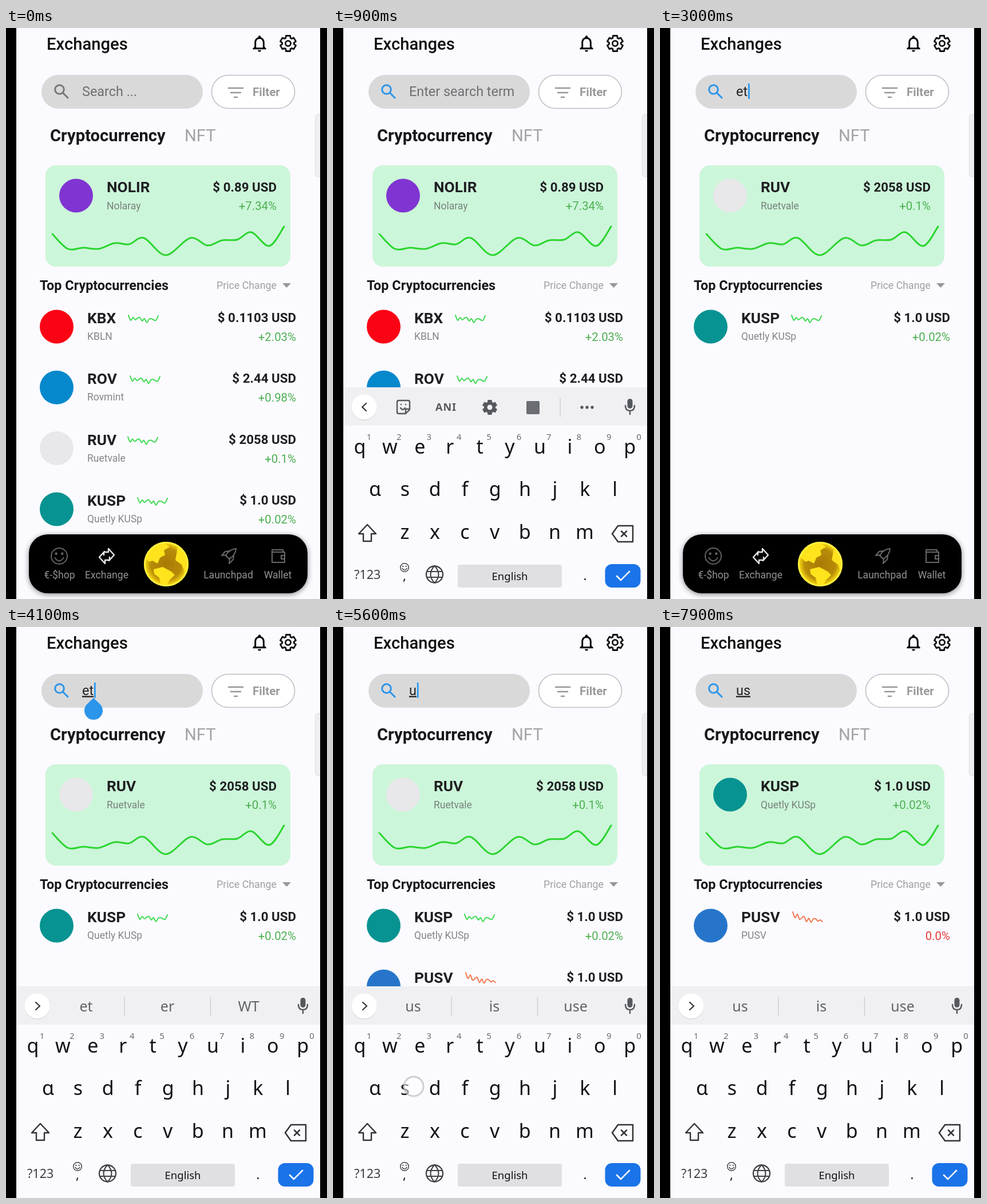
Recreate the animation shown at these times as an HTML page. Size 561 by 998 pixels, loop 8 s.

```html
<!DOCTYPE html>
<html lang="en">
<head>
<meta charset="utf-8">
<style>
html, body { margin: 0; width: 100%; height: 100%; overflow: hidden; background: #000; }
svg { display: block; width: 561px; height: 998px; font-family: Roboto, sans-serif; }
.keys { font-family: "Noto Sans", "Open Sans", sans-serif; }
.line { fill: none; stroke-linecap: round; stroke-linejoin: round; }
</style>
</head>
<body>
<svg viewBox="0 0 561 998">
  <defs>
    <clipPath id="phone"><path d="M18 0H549V998H18Z"/></clipPath>
    <clipPath id="ball"><circle cx="280" cy="937" r="38.5"/></clipPath>
    <radialGradient id="gold">
      <stop offset="0" stop-color="#a87a05"/><stop offset=".7" stop-color="#b88c08"/>
      <stop offset=".92" stop-color="#f0d010"/><stop offset="1" stop-color="#fff04a"/>
    </radialGradient>
  </defs>
  <g clip-path="url(#phone)">
    <path fill="#fbfaff" d="M18 0H549V998H18Z"/>
    <g id="head"></g>
    <g id="search"></g>
    <g id="list"></g>
    <g id="nav"></g>
    <g id="handle"></g>
    <g id="board"><g id="keys"></g><g id="bar"></g><g id="press"></g></g>
    <circle id="touch" r="17" fill="#fff" fill-opacity=".55" stroke="#bbb" stroke-opacity=".7" stroke-width="3"/>
  </g>
</svg>
<script>
const LOOP = 8000;
const $ = id => document.getElementById(id);
const text = (x, y, size, str, fill = '#1f1f22', attrs = '') =>
  `<text x="${x}" y="${y}" font-size="${size}" fill="${fill}" ${attrs}>${str}</text>`;
const line = (d, color, width = 3) =>
  `<path class="line" d="${d}" stroke="${color}" stroke-width="${width}"/>`;
const disc = (x, y, r, fill, attrs = '') => `<circle cx="${x}" cy="${y}" r="${r}" fill="${fill}" ${attrs}/>`;
const ring = (x, y, r, color, width) => disc(x, y, r, 'none', `stroke="${color}" stroke-width="${width}"`);
const box = (x, y, w, h, r, fill, attrs = '') =>
  `<rect x="${x}" y="${y}" width="${w}" height="${h}" rx="${r}" fill="${fill}" ${attrs}/>`;
const BOLD = 'font-weight="700"', MED = 'font-weight="500"';
const END = 'text-anchor="end"', MID = 'text-anchor="middle"';

// Catmull-Rom curve through the points
function smooth(p) {
  let d = `M${p[0]}`;
  for (let i = 0; i < p.length - 1; i++) {
    const a = p[i - 1] || p[i], b = p[i], c = p[i + 1], e = p[i + 2] || c;
    d += `C${b[0] + (c[0] - a[0]) / 6} ${b[1] + (c[1] - a[1]) / 6} ` +
         `${c[0] - (e[0] - b[0]) / 6} ${c[1] - (e[1] - b[1]) / 6} ${c}`;
  }
  return d;
}

function gear(x, y, r) {
  const pts = [];
  for (let i = 0; i < 6; i++)
    for (const [turn, k] of [[-24, .74], [-15, 1], [15, 1], [24, .74]]) {
      const a = (i * 60 + turn - 90) * Math.PI / 180;
      pts.push(`${x + r * k * Math.cos(a)} ${y + r * k * Math.sin(a)}`);
    }
  return `M${pts.join('L')}Z`;
}

const smile = (x, y, r, color, width) => ring(x, y, r, color, width) +
  line(`M${x - r * .55} ${y + r * .2}Q${x} ${y + r} ${x + r * .55} ${y + r * .2}`, color, width) +
  disc(x - r * .38, y - r * .3, r * .16, color) + disc(x + r * .38, y - r * .3, r * .16, color);

// ticker, name, price, change, colour, sparkline x
const coins = [
  ['NOLIR', 'Nolaray', '0.89', '+7.34', '#8035d2', 0],
  ['KBX', 'KBLN', '0.1103', '+2.03', '#fb0315', 214],
  ['ROV', 'Rovmint', '2.44', '+0.98', '#0588cc', 217],
  ['RUV', 'Ruetvale', '2058', '+0.1', '#e8e8ea', 213],
  ['KUSP', 'Quetly KUSp', '1.0', '+0.02', '#079391', 230],
  ['QEBO', 'Qeboin', '0.0776', '-0.4', '#c3a233', 232],
  ['PUSV', 'PUSV', '1.0', '0.0', '#2775ca', 232],
];
const find = q => coins.filter(c => (c[0] + ' ' + c[1]).toLowerCase().includes(q));
const tint = change => change[0] === '+' ? '#4caf50' : '#e53935';

const chart = line(smooth([[81, 360], [108, 386], [135, 384], [162, 386], [190, 376], [215, 378], [241, 367],
  [279, 397], [322, 367], [352, 380], [378, 371], [404, 370], [429, 357], [460, 381], [486, 347]]), '#2bd52f');
const rising = [1, 10, 5, 9, 6, 5, 11, 7, 14, 8, 7, 9, 10, 2];
const falling = [-3, 7, 1, 10, 7, 5, 14, 8, 15, 9, 9, 13, 11, 14];
const spark = (x, y, up) => line(smooth((up ? rising : falling).map((v, i) => [x + i * 4, y + v])),
  up ? '#3fdc52' : '#f2784f', 2);

function card([ticker, name, price, change, color]) {
  return box(69, 240, 428, 177, 18, '#ccf6da') + disc(122.5, 293, 29.5, color) +
    text(176, 287, 26.3, ticker, undefined, BOLD) + text(176, 317, 17.5, name, '#77827b') +
    text(473, 286, 22.3, `$ ${price} USD`, undefined, BOLD + END) +
    text(473, 318, 20.4, change + '%', tint(change), END) + chart;
}

function row([ticker, name, price, change, color, sx], i) {
  const y = 522 + i * 106.3;
  return disc(88.5, y, 29.5, color) + text(142, y - 6, 26.3, ticker, undefined, BOLD) +
    text(142, y + 23, 17.5, name, '#858588') + spark(sx, y - 21, tint(change) === '#4caf50') +
    text(507, y - 8, 22.3, `$ ${price} USD`, undefined, BOLD + END) +
    text(507, y + 25, 20.4, change + '%', tint(change), END);
}

const BELL = 'M12 22c1.1 0 2-.9 2-2h-4c0 1.1.9 2 2 2zm6-6v-5c0-3.07-1.63-5.64-4.5-6.32V4c0-.83-.67-1.5-1.5-1.5' +
  's-1.5.67-1.5 1.5v.68C7.64 5.36 6 7.92 6 11v5l-2 2v1h16v-1zm-2 1H8v-6c0-2.48 1.51-4.5 4-4.5s4 2.02 4 4.5z';
$('head').innerHTML =
  text(71, 38, 29.2, 'Exchanges', '#111', MED) +
  `<path transform="translate(425.5 9.5) scale(1.46)" d="${BELL}"/>` +
  line(gear(493, 27, 14), '#111', 2.8) + ring(493, 27, 4.6, '#111', 2.8) +
  box(62, 82, 282, 59, 29.5, '#d9d9da') +
  box(359.5, 82.5, 145, 58, 29, '#fff', 'stroke="#bfbfc2" stroke-width="1.6"') +
  line('M389 105H414M393 113H410M399 121H404', '#97979a', 2.6) +
  text(431, 119, 20.6, 'Filter', '#9a9a9d', BOLD) +
  text(77, 198, 29.2, 'Cryptocurrency', '#18181b', BOLD) + text(312, 198, 29.2, 'NFT', '#a3a3a6') +
  box(540.5, 151, 20, 109, 5, '#efeff1', 'stroke="#dedee0"') +
  text(59, 458, 23.4, 'Top Cryptocurrencies', '#18181b', BOLD) +
  text(368, 455.5, 17.8, 'Price Change', '#a0a0a3') + '<path fill="#97979a" d="M483 446h15l-7.500 8z"/>';

const land = `<path id="land" fill="#ffe31c" d="M243 912q12-14 34-12l9 7-10 6 2 8-9 5-4 10-9-5-6 2-8-8z
  M258 946l16-4 15 8 6 6-9 9-7 13-8-3-3-14-9-7zM301 903l22 5 9 20-9 4 2 18-9 10-9-22-11-8z"/>`;
$('nav').innerHTML =
  box(40, 885, 487, 103, 33, '#000', 'style="filter:drop-shadow(0 2px 5px #0007)"') +
  smile(93, 923, 14, '#626264', 2) +
  line('M171 921v-5h8v-6l10 11-9 10M181 925v5h-8v6l-10-11 9-10', '#e6e6e6', 2.4) +
  line('M402 910q-12 1-18 12l6 6q11-6 12-18zM385 921l-8 1 6-7 7-1M391 927l-1 9 7-7 1-6', '#68686a', 2) +
  line('M466 912h18v4h3v18h-22V912M466 916h18M481 922h6v6h-6z', '#68686a', 2) +
  [[93.5, '€-$hop'], [176, 'Exchange'], [388.5, 'Launchpad'], [475, 'Wallet']]
    .map(([x, s]) => text(x, 962, 17.6, s, '#929294', MID)).join('') +
  disc(280, 937, 39, 'url(#gold)') +
  `<g clip-path="url(#ball)"><g id="globe">${land}<use href="#land" x="130"/></g></g>` +
  ring(280, 937, 37.5, '#ffee3c', 3);

const INK = '#111214', GREY = '#55585c', STEP = 52.4;
const letters = (str, x, y) => [...str].map((c, i) => text(x + i * STEP, y, 34, c, INK, MID)).join('');
$('board').setAttribute('class', 'keys');
$('keys').innerHTML =
  box(18, 628, 531, 370, 0, '#fbfaff') + box(18, 628, 531, 67, 0, '#f0f0f3') +
  disc(54.5, 664, 22, '#d9d9dc') + disc(54.5, 662.5, 22, '#fff') +
  box(514.5, 648, 9, 17, 4.5, GREY) + line('M511 660q0 9 8 9t8-9M519 669v6', GREY, 2.5) +
  letters('qwertyuiop', 47, 744) + letters('ɑsdfghjkl', 73.5, 818) + letters('zxcvbnm', 125.500, 893) +
  [...'1234567890'].map((c, i) => text(63 + i * STEP, 719.5, 15, c, '#6a6c70', MID)).join('') +
  line('M60 868L75 884H67V897H53V884H45Z', '#333', 2.4) +
  text(37, 963, 21.5, '?123', '#3a3c40') + smile(125, 943, 7.3, '#444', 1.5) + text(125, 965, 22, ',', INK, MID) +
  ring(177.5, 955, 14.5, '#3f4145', 2.3) +
  line('M164 950h27M164 960h27M177.500 940q-14 15 0 30q14-15 0-30', '#3f4145', 2) +
  box(218, 938, 182, 40, 4, '#e0dfe3') + text(309, 965, 18.5, 'English', INK, MID) +
  text(440.5, 965, 22, '.', INK, MID) +
  box(475.5, 937, 62, 41, 12, '#1a73e8') + line('M496 958l7 7 15-15', '#fff', 2.6);

const split = (...xs) => line(xs.map(x => `M${x} 647v32`).join(''), '#cfcfd3', 1.5);
const tools = line('M58 656l-7 6.500 7 6.500', '#333', 2.2) +
  line('M115 651h16q3 0 3 3v13l-7 7h-12q-3 0-3-3v-17q0-3 3-3zM134 666h-7v8M118 664q4 6 8 0M119 658h0M127 658h0', GREY, 2.4) +
  text(197.500, 669, 18, 'ANI', GREY, BOLD + MID + ' letter-spacing="1"') +
  `<path fill="${GREY}" fill-rule="evenodd" d="${gear(274, 663, 13.500)}M278.500 663a4.500 4.500 0 1 0-9 0a4.500 4.500 0 1 0 9 0Z"/>` +
  box(338, 652, 23, 23, 2, '#6a6d71') + split(397) + [435, 444, 453].map(x => disc(x, 663, 2.7, GREY)).join('');
const hints = { e: 'e r ek', et: 'et er WT', u: 'us is use', us: 'us is use' };
const words = q => line('M52 656l7 6.500-7 6.500', '#333', 2.2) + split(207, 357.5) +
  hints[q].split(' ').map((w, i) => text(140 + i * 142, 672, 25, w, '#5f6368', MID)).join('');
const erase = fill => line('M488 884L498 870H524V898H498Z', fill, 2.5) + line('M504 879.500l9 9m0-9l-9 9', fill, 2.5);

const edits = [[0, ''], [1600, 'e'], [2000, 'et'], [4800, 'e'], [5000, ''], [5400, 'u'], [5700, 'us'], [6800, 'u'], [7300, 'us']];
const FOCUS = 300, REFOCUS = 3750;
const DEL = [509, 884];
// release time, position
const taps = [[300, 205, 112], [1600, 152, 735], [2000, 258, 735], [REFOCUS, 156, 112], [4800, ...DEL], [5000, ...DEL],
  [5400, 362, 735], [5700, 141, 803], [6800, ...DEL], [7300, 130, 805]];

const clamp = v => Math.max(0, Math.min(1, v));
const ease = (t, start, len) => 1 - (1 - clamp((t - start) / len)) ** 3;
const pen = document.createElement('canvas').getContext('2d');
const shown = {};
function set(id, html) {
  if (shown[id] !== html) $(id).innerHTML = shown[id] = html;
}

function searchBox(t, q, since) {
  const focused = t >= FOCUS, color = focused ? '#2b95ea' : '#77777a';
  const blank = since === 0 || q === '' ? 1 : 0;
  const fade = since === 0 ? 1 : blank ? clamp((t - since) / 120) : since === 1600 ? 1 - clamp((t - since) / 125) : 0;
  const typing = t < 2750 || t >= REFOCUS;
  pen.font = '23.4px Roboto, sans-serif';
  const end = 134 + pen.measureText(q).width;
  const anchor = Math.max(since, FOCUS, t >= REFOCUS ? REFOCUS : 0);
  const lit = focused && (t - anchor) % 1000 < 500;
  return ring(93.5, 107.5, 7.8, color, 3) + line('M99.500 113.500l8.500 8.500', color, 3) +
    text(133, 118.5, 23.4, focused ? 'Enter search term' : 'Search ...', '#6f6f72', `opacity="${fade}"`) +
    text(133, 118.5, 23.4, q, '#222', typing ? 'text-decoration="underline"' : '') +
    (lit ? box(end, 97, 2.6, 27, 0, '#2196f3') : '');
}

function draw(t) {
  const [since, q] = edits.filter(e => e[0] <= t).pop();
  const found = find(q);
  set('search', searchBox(t, q, since));
  set('list', card(found[0]) + found.slice(1, 5).map(row).join(''));
  set('handle', t >= REFOCUS && t < 4800
    ? '<path fill="#2b95ea" d="M153 124L164.500 135A16 16 0 1 1 141.500 135Z"/>' : '');
  set('bar', q ? words(q) : tools);

  const open = t < 2700 ? ease(t, 350, 250) : t < 3800 ? 1 - ease(t, 2750, 200) : ease(t, 3850, 250);
  $('board').setAttribute('transform', `translate(0 ${370 * (1 - open)})`);
  $('globe').setAttribute('transform', `translate(${-130 * (t / 3100 % 1)} 0)`);

  const tap = taps.find(p => t >= p[0] - 130 && t < p[0]);
  const held = tap && tap[1] === DEL[0];
  set('press', (held ? box(471, 852, 72, 60, 0, '#dedde1') : '') + erase('#333'));
  $('touch').setAttribute('visibility', tap ? 'visible' : 'hidden');
  if (tap) {
    $('touch').setAttribute('cx', tap[1]);
    $('touch').setAttribute('cy', tap[2]);
  }
}

function frame() {
  draw(performance.now() % LOOP);
  requestAnimationFrame(frame);
}
frame();
</script>
</body>
</html>
```
